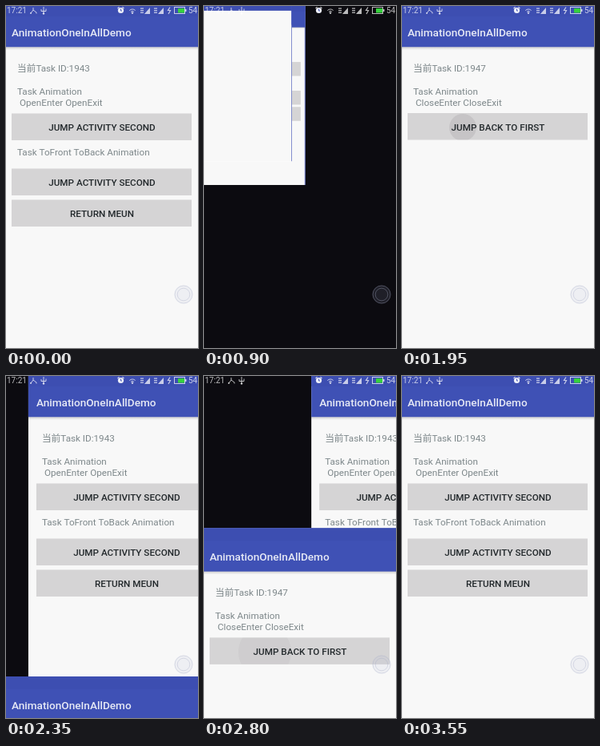
An HTML page with a canvas for the animation above (3.6 s loop, 240x428 px).

```html
<!DOCTYPE html>
<html lang="en">
<head>
<meta charset="utf-8">
<style>
  html, body { margin: 0; width: 100%; height: 100%; overflow: hidden; background: #0c0b10; }
  canvas { display: block; width: 240px; height: 428px; }
</style>
</head>
<body>
<canvas id="stage" width="240" height="428"></canvas>
<script>
const ctx = document.getElementById('stage').getContext('2d');
const LOOP = 3600;
const BLACK = '#0c0b10';
const PAGE = '#f8f8f8';
const BLUE = '#3f51b5';
const STATUS_BLUE = '#3d4eb1';
const ICON = 'rgba(255,255,255,.72)';
const FONT = 'Roboto, "Noto Sans CJK SC", "Noto Sans CJK", sans-serif';

const OPEN = { exitStart: 372, enterStart: 391, duration: 1087 };
const CLOSE = { enterStart: 2012, exitStart: 2020, duration: 1466 };
const FIRST_PRESS = 230, SECOND_PRESS = 1850;

const clamp = v => Math.max(0, Math.min(1, v));
const ease = v => (1 - Math.cos(Math.PI * clamp(v))) / 2;

function rect(x, y, w, h, color) {
  ctx.fillStyle = color;
  ctx.fillRect(x, y, w, h);
}

function circle(x, y, r, color, lineWidth) {
  ctx.beginPath();
  ctx.arc(x, y, r, 0, Math.PI * 2);
  if (lineWidth) {
    ctx.strokeStyle = color;
    ctx.lineWidth = lineWidth;
    ctx.stroke();
  } else {
    ctx.fillStyle = color;
    ctx.fill();
  }
}

function path(points, width = 1, color = ICON) {
  ctx.beginPath();
  points.forEach(([x, y], i) => i ? ctx.lineTo(x, y) : ctx.moveTo(x, y));
  ctx.strokeStyle = color;
  ctx.lineWidth = width;
  ctx.stroke();
}

function text(str, x, y, size, color, weight = 400, align = 'left') {
  ctx.font = `${weight} ${size}px ${FONT}`;
  ctx.textAlign = align;
  ctx.fillStyle = color;
  ctx.fillText(str, x, y);
}

const label = (str, x, y) => text(str, x, y, 11.7, '#7d878a');

function ripple(age) {
  if (age <= 0) return;
  const radius = Math.min(36, Math.min(15, age * 0.2) + age * 0.019);
  const alpha = 0.085 - 0.05 * clamp(age / 950);
  circle(76, 152, radius, `rgba(30,20,30,${alpha})`);
}

function button(str, y, pressAge = 0) {
  rect(7, y, 225, 33.5, '#d5d4d5');
  ctx.save();
  ctx.beginPath();
  ctx.rect(7, y, 225, 33.5);
  ctx.clip();
  ripple(pressAge);
  ctx.restore();
  text(str, 120, y + 21.5, 11.7, '#23292c', 500, 'center');
}

// The window reaches slightly past the stage on every side.
function page(taskId, transition) {
  rect(-3, -3, 246, 433, PAGE);
  rect(241.5, -3, 1.5, 433, BLUE);
  rect(-3, -3, 246, 54.3, BLUE);
  rect(-3, -3, 246, 16, STATUS_BLUE);
  const shadow = ctx.createLinearGradient(0, 51, 0, 55);
  shadow.addColorStop(0, 'rgba(0,0,0,.18)');
  shadow.addColorStop(1, 'rgba(0,0,0,0)');
  rect(-3, 51.3, 246, 4, shadow);
  text('AnimationOneInAllDemo', 7, 37.5, 13.6, '#e6e9f5', 500);
  label('当前Task ID:' + taskId, 14, 81.5);
  label('Task Animation', 14, 111);
  label(transition, 17, 124.5);
}

function firstPage(pressAge) {
  page(1943, 'OpenEnter OpenExit');
  button('JUMP ACTIVITY SECOND', 134.5, pressAge);
  label('Task ToFront ToBack Animation', 14, 187);
  button('JUMP ACTIVITY SECOND', 203.5);
  button('RETURN MEUN', 242.5);
}

function secondPage(pressAge, veil = 0) {
  page(1947, 'CloseEnter CloseExit');
  button('JUMP BACK TO FIRST', 134, pressAge);
  rect(-3, 13, 244.5, 417, `rgba(248,248,248,${veil})`);
}

function place(x, y, scale, draw) {
  ctx.save();
  ctx.translate(x, y);
  ctx.scale(scale, scale);
  draw();
  ctx.restore();
}

function signal(x) {
  for (let i = 0; i < 3; i++) rect(x, 2.5 + i * 2.6, 4, 1.2, ICON);
  ctx.beginPath();
  ctx.moveTo(x + 5, 10);
  ctx.lineTo(x + 12, 10);
  ctx.lineTo(x + 12, 2);
  ctx.fillStyle = ICON;
  ctx.fill();
}

function statusIcons() {
  text('17:21', 1, 9.3, 10, ICON);
  path([[34, 2], [34, 5], [31, 9]]);
  path([[34, 5], [38, 8], [38, 9.5]]);
  path([[30, 9], [32, 9]], 1.5);
  path([[47, 1], [47, 10]]);
  path([[44, 4], [44, 6.5], [50, 6.5], [50, 3.5]]);
  circle(47, 9.5, 1.2, ICON);

  circle(143.5, 5.5, 3.6, '#eef0fa');
  path([[143.5, 3.5], [143.5, 6], [145, 6]], 0.9, STATUS_BLUE);
  path([[139.5, 3], [141.5, 1.2]], 1.2);
  path([[145.5, 1.2], [147.5, 3]], 1.2);
  for (const r of [2.5, 5]) {
    ctx.beginPath();
    ctx.arc(158, 9, r, -2.4, -0.74);
    ctx.lineWidth = 1;
    ctx.strokeStyle = ICON;
    ctx.stroke();
  }
  circle(158, 8.7, 1.2, ICON);
  signal(168);
  signal(185);
  path([[205, 1.5], [202.5, 5.5], [205.5, 5.5], [203, 10]], 1.2);
  ctx.strokeStyle = ICON;
  ctx.lineWidth = 1;
  ctx.strokeRect(210.5, 1.5, 13, 8);
  rect(215, 3, 8, 5.5, '#35d13c');
  rect(224, 4, 1.5, 3, ICON);
  text('54', 228, 9.3, 10, ICON);
}

function touchDot() {
  circle(222, 361, 11.5, 'rgba(175,183,210,.12)');
  circle(222, 361, 11, 'rgba(165,173,198,.35)', 1);
  circle(222, 361, 7.8, 'rgba(165,173,198,.35)', 1);
}

function render(t) {
  rect(0, 0, 240, 428, BLACK);
  if (t < CLOSE.enterStart) {
    const exit = 1 - ease((t - OPEN.exitStart) / OPEN.duration);
    const enter = ease((t - OPEN.enterStart) / OPEN.duration);
    const veil = 1 - clamp((t - 1150) / 230);
    if (exit > 0) place(0, 0, exit, () => firstPage(t - FIRST_PRESS));
    if (enter > 0) place(0, 0, enter, () => secondPage(t - SECOND_PRESS, veil));
  } else if (t < CLOSE.exitStart + CLOSE.duration) {
    const across = ease((t - CLOSE.enterStart) / CLOSE.duration);
    const up = ease((t - CLOSE.exitStart) / CLOSE.duration);
    place(245 * across, 0, 1, () => firstPage(0));
    place(0, 431 * (1 - up), 1, () => secondPage(t - SECOND_PRESS));
  } else {
    firstPage(0);
  }
  touchDot();
  statusIcons();
}

const begin = performance.now();
function tick() {
  render((performance.now() - begin) % LOOP);
  requestAnimationFrame(tick);
}
tick();
</script>
</body>
</html>
```
